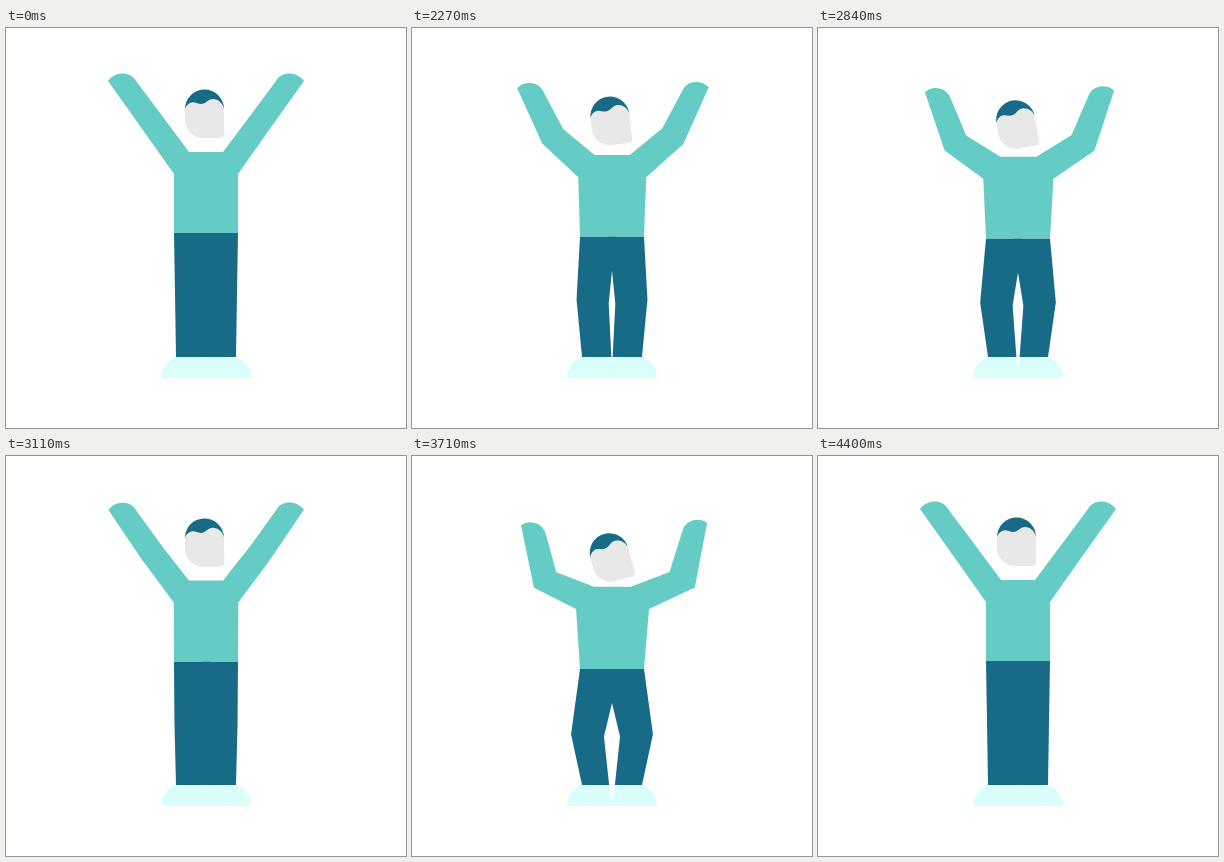
An HTML page that plays this animation: 400 by 400 pixels, repeating every 4460 ms.

```html
<!DOCTYPE html>
<html lang="en">
<head>
<meta charset="utf-8">
<title>Bouncing figure</title>
<style>
  html, body { margin: 0; width: 100%; height: 100%; overflow: hidden; background: #fff; }
  svg { display: block; width: 100%; height: 100%; }
</style>
</head>
<body>
<svg viewBox="0 0 400 400">
  <defs>
    <g id="half">
      <path id="shoe" fill="#dafffb"/>
      <path id="leg" fill="#176b87"/>
    </g>
  </defs>
  <use href="#half"/>
  <use href="#half" transform="matrix(-1 0 0 1 400 0)"/>
  <path id="body" fill="#64ccc5"/>
  <g id="head">
    <path fill="#e8e8e8" d="M179 80V92A18 18 0 0 0 197 110H214A4 4 0 0 0 218 106V80C216 65 181 65 179 80Z"/>
    <path fill="#176b87" d="M179 81A19.5 19.5 0 0 1 218 81C217 75 212 71 207 71C202 71 200 76 195 76C191 76 188 73 184 75Q180 77 179 81Z"/>
  </g>
</svg>
<script>
const LOOP = 4460, START = 2000, BEND = 600, BOUNCES = 2;

// Each part: path standing upright, path with knees and elbows bent
const poses = {
  body: [
    `M168 205 L168 146 L137 102.3 L102 53 C109 43 125 43 130 53 L156.7 88.5 L183 124
     L217 124 L244.3 87.5 L270 53 C275 43 291 43 298 53 L262 103.5 L232 146 L232 205Z`,
    `M168 213.5 L163.8 153.4 L121.1 133.3 L109.4 70 C117 64.5 131 67 134.2 80 L143.6 117.7 L182 131.2
     L219 131.2 L258.3 117.7 L270 77.5 C273 64.5 287 62 295 67.8 L284 133 L237.3 153.4 L232 213.5Z`
  ],
  leg: [
    'M168 205 L204 205 L200 239 L200.5 272 L201.2 329 L170 329 L169 266Z',
    'M168 213.5 L204 213.5 L200 247.5 L191.5 281 L196.9 329 L170 329 L158.5 279Z'
  ],
  shoe: [
    'M155 350 C155 340 162 331 170 329 L201.2 329 L201 350Z',
    'M155 350 C155 340 162 331 170 329 L196.9 329 L201 350Z'
  ]
};

const el = id => document.getElementById(id);
const number = /[\d.]+/g;

function mix([from, to], k) {
  const ends = to.match(number);
  let i = 0;
  return from.replace(number, a => +a + (ends[i++] - a) * k);
}

function draw(now) {
  const t = Math.min(Math.max(now % LOOP - START, 0), 2 * BEND * BOUNCES);
  const bend = (1 - Math.cos(Math.PI * t / BEND)) / 2;
  for (const id in poses) el(id).setAttribute('d', mix(poses[id], bend));
  el('head').setAttribute('transform', `translate(0 ${16.3 * bend}) rotate(${-16 * bend} 199 86)`);
}

const begin = performance.now();
function tick() {
  draw(performance.now() - begin);
  requestAnimationFrame(tick);
}
tick();
</script>
</body>
</html>
```
